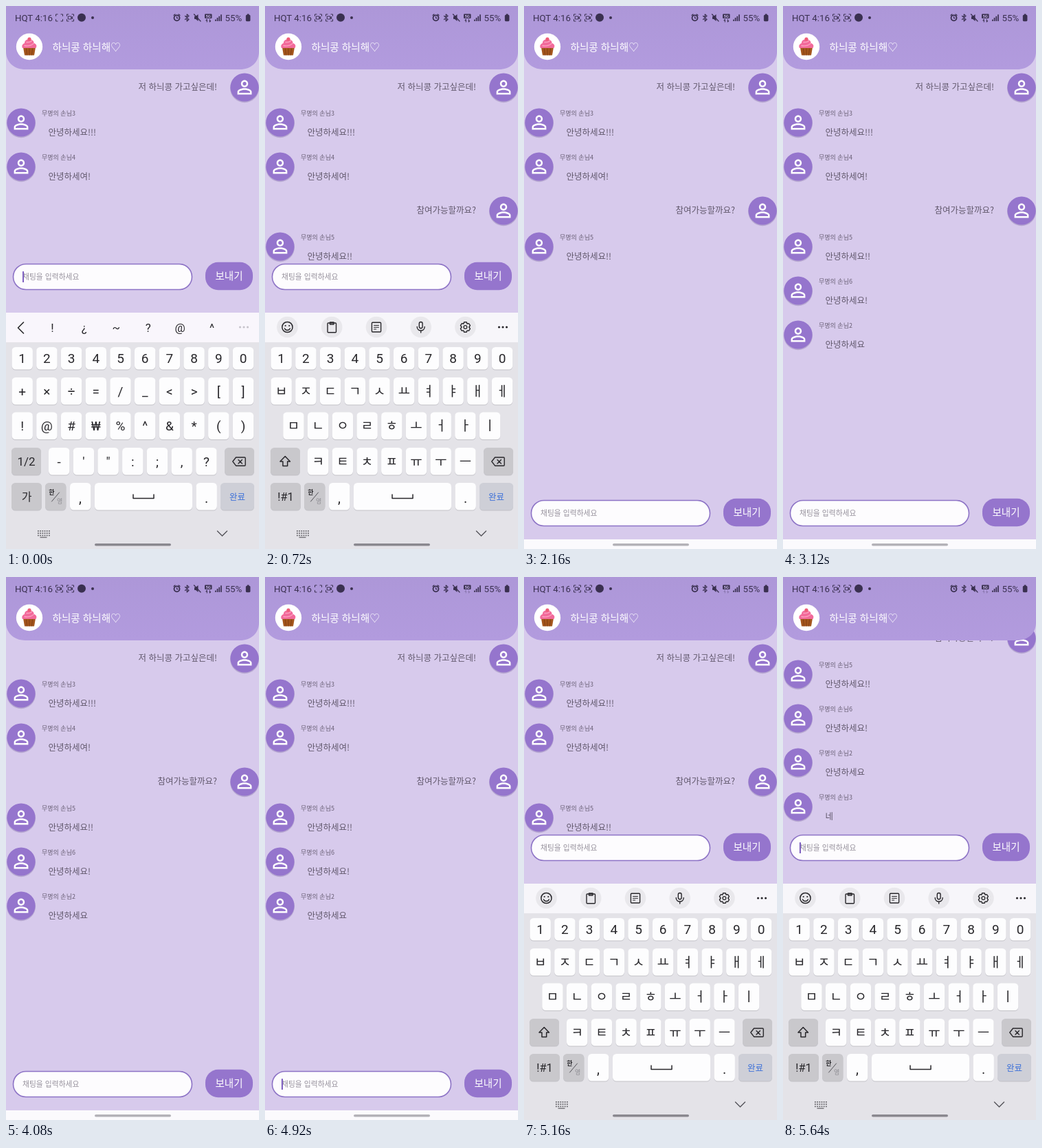
Animation of 368 by 788 pixels, one loop 5760 ms. Source, as an HTML page:

```html
<!DOCTYPE html>
<html lang="ko">
<head>
<meta charset="utf-8">
<title>Chat room</title>
<style>
html, body { margin: 0; width: 100%; height: 100%; overflow: hidden; background: #d7caec; }
svg { display: block; width: 368px; height: 788px; }
text { font-family: "Noto Sans CJK KR", "Noto Sans CJK", "Noto Sans", sans-serif; }
.latin, .latin text { font-family: Roboto, "Noto Sans CJK KR", sans-serif; }
.mid { text-anchor: middle; }
.end { text-anchor: end; }
.line { fill: none; stroke-linecap: round; stroke-linejoin: round; }
</style>
</head>
<body>
<svg id="stage" viewBox="0 0 368 788"></svg>
<script>
const INK = '#28272b', STATUS = '#3a3050', PURPLE = '#9575cd';
const LOOP = 5760, KEYS_H = 343, PITCH = 35.7;

const text = (x, y, size, fill, str, cls = '', more = '') =>
  `<text x="${x}" y="${y}" font-size="${size}" fill="${fill}" class="${cls}" ${more}>${str.replace(/&/g, '&amp;').replace(/</g, '&lt;')}</text>`;
const rect = (x, y, w, h, r, fill, more = '') =>
  `<rect x="${x}" y="${y}" width="${w}" height="${h}" rx="${r}" fill="${fill}" ${more}/>`;
const dot = (x, y, r, fill, more = '') =>
  `<circle cx="${x}" cy="${y}" r="${r}" fill="${fill}" ${more}/>`;
const line = (d, color = INK, w = 1.4) =>
  `<path class="line" d="${d}" stroke="${color}" stroke-width="${w}"/>`;

// Chat list
const PERSON = 'M12 5.9c1.16 0 2.1.94 2.1 2.1s-.94 2.1-2.1 2.1S9.9 9.16 9.9 8s.94-2.1 2.1-2.1m0 9c2.97 0 6.1 1.46 6.1 2.1v1.1H5.9V17c0-.64 3.13-2.1 6.1-2.1M12 4C9.79 4 8 5.79 8 8s1.79 4 4 4 4-1.79 4-4-1.79-4-4-4zm0 9c-2.67 0-8 1.34-8 4v3h16v-3c0-2.66-5.33-4-8-4z';
const MESSAGES = [
  [118, '', '저 하늬콩 가고싶은데!'],
  [169, '3', '안녕하세요!!!'],
  [233, '4', '안녕하세여!'],
  [297, '', '참여가능할까요?'],
  [349, '5', '안녕하세요!!'],
  [413, '6', '안녕하세요!'],
  [477, '2', '안녕하세요'],
  [541, '3', '네'],
];
const avatar = (x, y) =>
  dot(x, y + 1.2, 21, '#79649f', 'opacity=".35"') + dot(x, y, 20.6, PURPLE) +
  `<path d="${PERSON}" fill="#fff" transform="translate(${x - 15.6} ${y - 15.6}) scale(1.3)"/>`;
const message = ([y, who, str]) => `<g class="msg">` + (who
  ? avatar(22, y) + text(52, y - 10, 9, '#6a6076', '무명의 손님' + who) + text(61.5, y + 19, 12.5, '#61586c', str)
  : avatar(347, y) + text(307, y + 3.5, 12.5, '#61586c', str, 'end')) + `</g>`;

// Status bar and header
const bracket = x => line(`M${x - 5} 14.5V12H${x - 2.5}M${x + 2.5} 12H${x + 5}V14.5M${x + 5} 19.5V22H${x + 2.5}M${x - 2.5} 22H${x - 5}V19.5`, STATUS, 1);
const camera = (x, id) => `<g id="${id}">${line(`M${x - 2.8} 15H${x + 1.5}V19H${x - 2.8}ZM${x + 1.5} 17L${x + 3.2} 15.5V18.5Z`, STATUS, 1)}</g>`;
const status = () => `<g class="latin">` +
  text(13, 21.5, 13.3, STATUS, 'HQT 4:16') +
  bracket(77.5) + camera(77.5, 'cam') + bracket(93.5) + camera(93.5, 'cam2') +
  dot(110, 16.8, 6, STATUS) + dot(126, 17, 2, STATUS) +
  dot(248.5, 17.3, 4, 'none', `stroke="${STATUS}" stroke-width="1.8"`) +
  line('M244 13.5L246 12M253 13.5L251 12M248.5 15.5V17.6H250', STATUS, 1.2) +
  line('M260.5 14.5L266 19.5L263.2 22V12L266 14.5L260.5 19.5', STATUS, 1.2) +
  `<path d="M274 15H276L279.5 12V22L276 19H274Z" fill="${STATUS}"/>` + line('M273.5 12L283 22', STATUS, 1.3) +
  rect(289, 11.5, 10.5, 6.6, 1, STATUS) + text(294.2, 17, 6, '#c5b3e6', '5G', 'mid', 'font-weight="700"') +
  `<g id="net">${line('M292.3 23V19.5L291 20.8M296.3 19.5V23L297.6 21.7', STATUS, 1.1)}</g>` +
  [0, 1, 2, 3].map(i => rect(304 + i * 2.7, 19.5 - i * 2.4, 1.7, 2.5 + i * 2.4, .4, STATUS)).join('') +
  text(318.5, 21.5, 13.3, STATUS, '55%') +
  rect(348.8, 13, 6.6, 9.2, 1.4, STATUS) + rect(350.6, 11.6, 3, 2, .5, STATUS) + `</g>`;
const cupcake = () => dot(34, 59, 19.2, '#fff') +
  `<path d="M25 60H43L41 71.5H27Z" fill="#a4561d"/>` +
  line('M29.5 62L30.5 71M34 62V71M38.5 62L37.5 71', '#7d3d12', .9) +
  `<path d="M24 61C22 57 25 54.5 27 54C27 50 30 48.5 33 48.5C38 48 41 51 40.5 54C44 54.5 45.5 58 43.5 61Z" fill="#f26a9b"/>` +
  line('M27 57.5C32 58.5 37 57 40 54.5M30 52.5C33 53 36 52 37.5 50.5', '#fba3c0', 1.3) +
  dot(34, 48, 2.6, '#ef5d78');
const header = () =>
  `<path d="M0 0H368V66C368 82 356 92 340 92H28C12 92 0 82 0 66Z" fill="url(#top)"/>` +
  status() + cupcake() + text(67.5, 65, 14.6, '#fff', '하늬콩 하늬해♡', '', 'font-weight="500"');

// Entry bar, drawn at its resting place
const entry = () => `<g id="entry">` +
  rect(10.5, 717.5, 260, 37, 18.5, '#fdfcfe', 'stroke="#8d73c6" stroke-width="1.6"') +
  text(24, 740, 10.8, '#97929d', '채팅을 입력하세요', '', 'id="hint"') +
  text(24, 740, 10.8, '#4b4653', '', '', 'id="typed"') +
  rect(24, 728, 2, 16, .5, '#7d5fc0', 'id="caret"') +
  rect(290, 714.8, 69, 40.4, 18.5, PURPLE) +
  text(324.5, 740.3, 14.5, '#fff', '보내기', 'mid', 'font-weight="500"') + `</g>`;

// Keyboard, drawn at its raised place
const key = (x, y, w, h, fill = '#fdfdfe') => rect(x, y + 1, w, h, 5.5, '#c3c2c8') + rect(x, y, w, h, 5.5, fill);
const GREY = '#c9c8cc';
const row = (x, y, h, str, size = 19) => [...str].map((c, i) => {
  const cx = x + i * PITCH;
  return key(cx - 15.2, y, 30.4, h) + text(cx, y + h / 2 + size * .36, size, INK, c, 'mid');
}).join('');
const rows = (two, three, x3, four) => row(23.7, 539, 39.5, two) + row(x3, 589.5, 39.5, three) + row(77.2, 641, 39.5, four);

const letters = () => `<g id="letters">` + rect(0, 445, 368, 43, 0, '#f7f6fa') +
  [32.5, 97.2, 162, 226.7, 291.4].map(x => dot(x, 466, 15.3, '#e9e8ec')).join('') +
  dot(32.5, 466, 7.6, 'none', `stroke="${INK}" stroke-width="1.5"`) +
  dot(29.7, 464, 1.1, INK) + dot(35.3, 464, 1.1, INK) + line('M28.6 468C30 471.4 35 471.4 36.4 468') +
  line('M92 460H102.4Q103.5 460 103.5 461V472.5Q103.5 473.7 102.4 473.7H92Q91 473.7 91 472.5V461Q91 460 92 460ZM94.5 459V462H100V459Z') +
  line('M156.5 459.3H167.5Q168.6 459.3 168.6 460.4V471.8Q168.6 473 167.5 473H156.5Q155.4 473 155.4 471.8V460.4Q155.4 459.3 156.5 459.3Z') +
  line('M158.6 463.5H165.4M158.6 466.2H165.4M158.6 469H161.6', INK, 1.1) +
  rect(224.3, 458.5, 4.8, 9.2, 2.4, 'none', `stroke="${INK}" stroke-width="1.4"`) +
  line('M221.2 465.5C221.2 472.8 232.2 472.8 232.2 465.5M226.7 471V474') +
  line('M289.6 458.8H293.2L294 461.2L296.4 460.6L298.4 463.7L296.8 466L298.4 468.4L296.4 471.4L294 470.9L293.2 473.3H289.6L288.8 470.9L286.4 471.4L284.4 468.4L286 466L284.4 463.7L286.4 460.6L288.8 461.2Z') +
  dot(291.4, 466, 2.4, 'none', `stroke="${INK}" stroke-width="1.3"`) +
  [340.5, 346, 351.5].map(x => dot(x, 466, 1.6, INK)).join('') +
  rows('ㅂㅈㄷㄱㅅㅛㅕㅑㅐㅔ', 'ㅁㄴㅇㄹㅎㅗㅓㅏㅣ', 41.5, 'ㅋㅌㅊㅍㅠㅜㅡ') +
  line('M29.3 653.5L36.5 661H32.7V667.5H26V661H22Z', INK, 1.5) +
  text(30, 718, 16.5, INK, '!#1', 'mid') + `</g>`;

const symbols = () => `<g id="symbols">` + rect(0, 445, 368, 43, 0, '#f9f6fc') +
  line('M25.5 459L17.5 467L25.5 475', INK, 1.6) +
  [...'!¿~?@^'].map((c, i) => text(67.5 + i * 46.4, 472.5, 17, INK, c, 'mid')).join('') +
  [340.5, 346, 351.5].map(x => dot(x, 466, 1.6, '#c6c3cb')).join('') +
  rows('+×÷=/_<>[]', '!@#₩%^&*()', 23.7, `-'":;,?`) +
  text(29.5, 667, 17, INK, '1/2', 'mid') + text(30, 718, 16, INK, '가', 'mid') + `</g>`;

const keyboard = () => `<g id="keyboard" class="latin">` + rect(0, 445, 368, KEYS_H, 0, '#e4e3e8') +
  row(23.7, 495, 32.5, '1234567890') +
  key(8, 641, 43, 39.5, GREY) + key(318, 641, 43, 39.5, GREY) +
  key(8, 692, 44, 39.5, GREY) + key(57, 692, 30.4, 39.5, GREY) +
  key(93, 692, 30.4, 39.5) + key(129, 692, 142, 39.5) + key(276.5, 692, 30.4, 39.5) +
  key(312, 692, 49, 39.5, '#cecfd7') +
  line('M334.5 655H347Q348.2 655 348.2 656.2V666Q348.2 667.2 347 667.2H334.5L329.8 661ZM338 658.5L343.4 664M343.4 658.5L338 664') +
  text(66.5, 709, 9, INK, '한', 'mid', 'font-weight="700"') + line('M66.5 719L77.5 706', '#55545a', 1) +
  text(78.2, 722, 9, '#8e8d93', '영', 'mid') +
  text(108, 721, 20, INK, ',', 'mid') + text(291.7, 721, 20, INK, '.', 'mid') +
  line('M185 709V714.5H215V709', INK, 1.5) +
  text(336.5, 716.5, 12.5, '#3d70d8', '완료', 'mid') +
  letters() + symbols() +
  [0, 1, 2].map(j => [0, 1, 2, 3, 4, 5].map(i => rect(46 + i * 3.2, 761 + j * 3.2, 1.8, 1.8, .3, '#67666b')).join('')).join('') +
  rect(49.5, 770.4, 10, 1.4, .3, '#67666b') +
  line('M307.5 762L314.5 769L321.5 762', '#55545a', 1.4) + `</g>`;

const stage = document.getElementById('stage');
stage.innerHTML = `<defs>
  <linearGradient id="top" x2="0" y2="1"><stop stop-color="#ad97d8"/><stop offset="1" stop-color="#b29bde"/></linearGradient>
  <clipPath id="view"><rect id="viewBox" width="368" height="710"/></clipPath></defs>` +
  rect(0, 0, 368, 788, 0, '#d7caec') +
  `<g clip-path="url(#view)"><g id="list">${MESSAGES.map(message).join('')}</g></g>` +
  header() + rect(0, 774, 368, 14, 0, '#fbfafd') + entry() + keyboard() +
  rect(129, 780, 111, 3.6, 1.8, '#7b7880', 'id="pill"');

const $ = id => document.getElementById(id);
const show = (node, on) => node.setAttribute('visibility', on ? 'inherit' : 'hidden');
const shift = (id, y) => $(id).setAttribute('transform', `translate(0 ${y})`);
const msgs = [...document.querySelectorAll('.msg')];

// Each step changes some values and keeps the rest.
const STEPS = [
  [0, { layout: 'symbols', drop: 0, raised: true, caret: true, typed: '', count: 3, scroll: 0 }],
  [120, { layout: 'letters', typed: '참' }],
  [240, { typed: '참여가' }],
  [360, { typed: '참여가능할까' }],
  [480, { layout: 'symbols', typed: '참여가능할까요?' }],
  [600, { typed: '', count: 4 }],
  [720, { layout: 'letters', caret: false, count: 5 }],
  [840, { drop: 268, raised: false }],
  [960, { drop: KEYS_H }],
  [2400, { count: 6 }],
  [2640, { count: 7 }],
  [4800, { caret: true }],
  [5040, { drop: 90, raised: true }],
  [5160, { drop: 0, caret: false }],
  [5280, { caret: true }],
  [5400, { count: 8, scroll: 120 }],
  [5520, { scroll: 208 }],
];

function draw(t) {
  const s = Object.assign({}, ...STEPS.filter(([at]) => at <= t).map(([, v]) => v));
  msgs.forEach((m, i) => show(m, i < s.count));
  shift('list', -s.scroll);
  $('viewBox').setAttribute('height', s.raised ? 372 : 710);
  shift('entry', s.raised ? -KEYS_H : 0);
  shift('keyboard', s.drop);
  show($('keyboard'), s.drop < KEYS_H);
  show($('letters'), s.layout === 'letters');
  show($('symbols'), s.layout === 'symbols');
  if ($('typed').textContent !== s.typed) $('typed').textContent = s.typed;
  show($('hint'), !s.typed);
  show($('caret'), s.caret);
  $('caret').setAttribute('x', 24 + (s.typed ? $('typed').getComputedTextLength() + 1 : 0));
  $('pill').setAttribute('opacity', s.drop < KEYS_H ? .85 : .55);
  show($('cam'), (t >= 1080 && t < 1440) || Math.floor(t / 240) % 2 === 1);
  const quiet = (t >= 1440 && t < 1920) || (t >= 3840 && t < 4080) || t >= 4320;
  $('net').setAttribute('opacity', quiet ? .3 : 1);
}

const start = performance.now();
function tick() {
  draw((performance.now() - start) % LOOP);
  requestAnimationFrame(tick);
}
tick();
</script>
</body>
</html>
```
